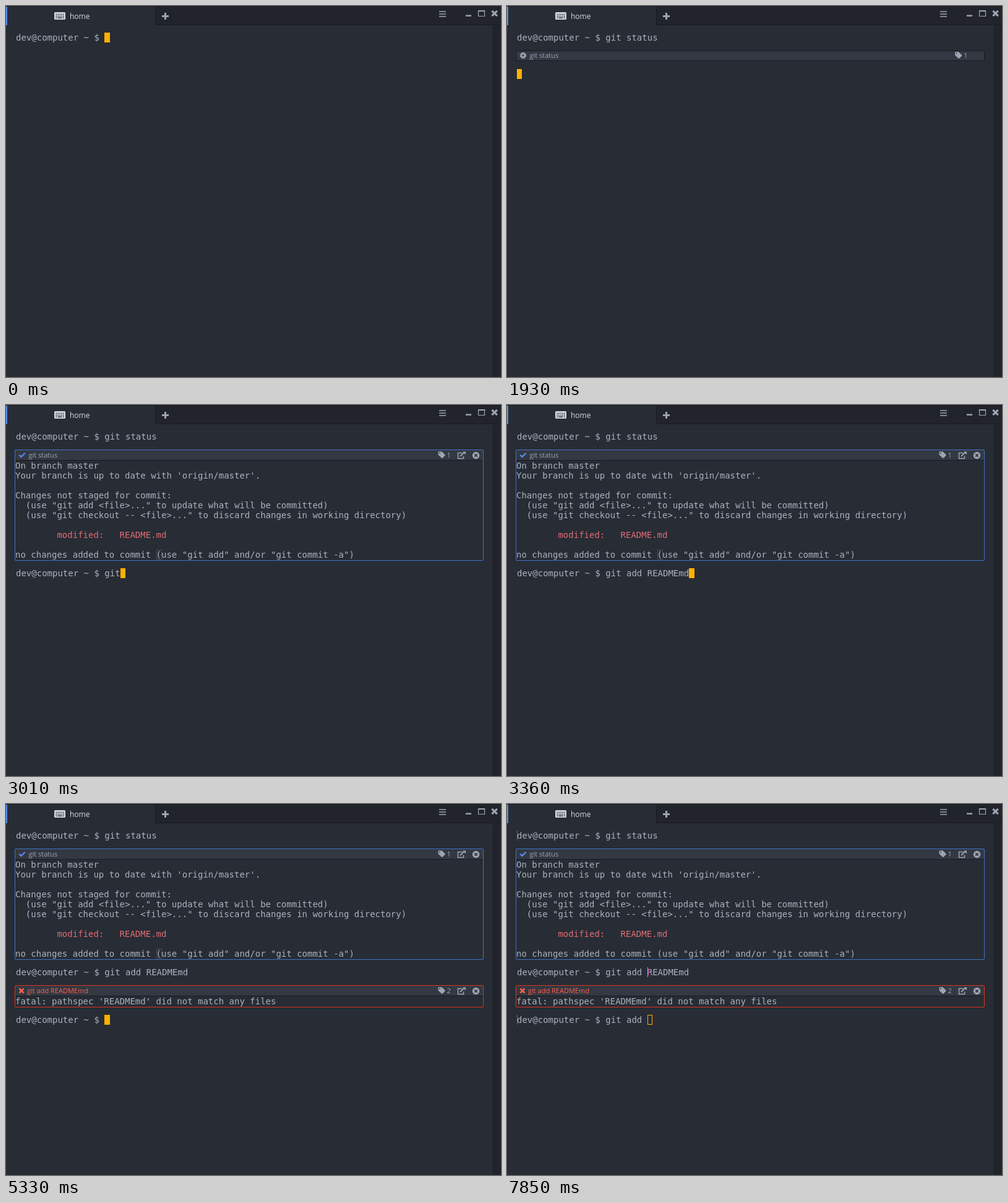
Write an HTML page that moves like this. It is 800 px wide and 600 px high and loops after 8000 ms.

```html
<!DOCTYPE html>
<html lang="en">
<head>
<meta charset="utf-8">
<title>Terminal</title>
<style>
html, body { margin: 0; width: 100%; height: 100%; overflow: hidden; background: #282c34; }
svg { display: block; width: 100vw; height: 100vh; }
text { white-space: pre; }
.mono { font: 14px "DejaVu Sans Mono", monospace; fill: #abb2bf; }
.ui { font: 11px "Open Sans", "Noto Sans", sans-serif; fill: #9da5b4; }
.tab { font-size: 12px; fill: #d7dae0; }
</style>
</head>
<body>
<svg viewBox="0 0 800 600">
  <rect width="800" height="600" fill="#282c34"/>
  <rect width="800" height="31" fill="#21252b"/>
  <rect x="786" y="31" width="14" height="569" fill="#21252b"/>
  <rect width="800" height="1" fill="#181a1f"/>
  <rect x="241" y="30" width="559" height="1" fill="#181a1f"/>
  <rect y="1" width="241" height="30" fill="#282c34"/>
  <rect x="241" width="1" height="31" fill="#181a1f"/>
  <rect y="1" width="2" height="30" fill="#568af2"/>
  <g id="keyboard">
    <rect x="78" y="10" width="18" height="12" rx="1.5" fill="#d7dae0"/>
    <path d="M80.5 13.5H94M80.5 16.5H94" stroke="#282c34" stroke-width="1.6" stroke-dasharray="1.7 1.2"/>
    <path d="M80.5 19.3h1.7M83.5 19.3h7M92 19.3h1.7" stroke="#282c34" stroke-width="1.5"/>
  </g>
  <text class="ui tab" x="103" y="21">home</text>
  <g stroke="#9da5b4" fill="none">
    <path d="M252 16.5h11M257.5 11v11" stroke-width="3"/>
    <path d="M700 9h11M700 13h11M700 17h11" stroke-width="1.6"/>
    <path d="M743 15.7h9" stroke-width="2.4"/>
    <path d="M763.5 7.5h10v9h-10zM763 8.3h11" stroke-width="1.2"/>
    <path d="M785.3 7.8l8.4 8.4m0-8.4l-8.4 8.4" stroke-width="3.2"/>
  </g>
  <g id="screen"></g>
</svg>
<script>
const LOOP = 8000, CELL = 8.428, LEFT = 16;
const GREY = '#9da5b4', AMBER = '#ffb000';
const PROMPT = 'dev@computer ~ $ ';
const screen = document.getElementById('screen');

const STATUS = [
  'On branch master',
  "Your branch is up to date with 'origin/master'.",
  '',
  'Changes not staged for commit:',
  '  (use "git add <file>..." to update what will be committed)',
  '  (use "git checkout -- <file>..." to discard changes in working directory)',
  '',
  '        modified:   README.md',
  '',
  'no changes added to commit (use "git add" and/or "git commit -a")'
];
const FATAL = ["fatal: pathspec 'READMEmd' did not match any files"];

const esc = s => s.replace(/&/g, '&amp;').replace(/</g, '&lt;');
const rect = (x, y, w, h, fill, extra = '') =>
  `<rect x="${x}" y="${y}" width="${w}" height="${h}" fill="${fill}" ${extra}/>`;
const label = (x, y, s, cls, fill) =>
  `<text class="${cls}" x="${x}" y="${y}"${fill ? ` style="fill:${fill}"` : ''}>${esc(s)}</text>`;
const line = (d, stroke, width) =>
  `<path d="${d}" fill="none" stroke="${stroke}" stroke-width="${width}"/>`;

// Part of a command typed in equal steps between two times
function typed(cmd, t, start, end, steps) {
  const done = Math.floor((t - start) / (end - start) * (steps - 1) + 1.02);
  const n = Math.max(0, Math.min(steps, done));
  return cmd.slice(0, Math.round(cmd.length * n / steps));
}

function cursor(col, y, hollow) {
  const x = Math.round(LEFT + col * CELL);
  const w = Math.round(LEFT + (col + 1) * CELL) - x;
  return hollow
    ? rect(x + .5, y + .5, w - 1, 15, 'none', `stroke="${AMBER}"`)
    : rect(x, y, w, 16, AMBER);
}

function prompt(y, cmd, active, hollow) {
  return label(LEFT, y + 13, PROMPT + cmd, 'mono') +
    (active ? cursor(PROMPT.length + cmd.length, y, hollow) : '');
}

const tag = (x, y) =>
  `<path d="M${x} ${y - 4}v4.5l5.5 5.3q.8.5 1.5 0l4-4q.5-.8 0-1.5l-5.2-5h-5q-.8 0-.8.7z" fill="${GREY}"/>` +
  `<circle cx="${x + 2.3}" cy="${y - 2.3}" r="1" fill="#333842"/>`;

const gear = (x, y) =>
  `<circle cx="${x}" cy="${y}" r="3" fill="none" stroke="${GREY}" stroke-width="2.6"/>` +
  `<circle cx="${x}" cy="${y}" r="4.5" fill="none" stroke="${GREY}" stroke-width="1.8" stroke-dasharray="2 1.534"/>`;

function running(y, cmd, id) {
  return rect(14.5, y + .5, 757, 16, '#333842', 'rx="1.5" stroke="#181a1f"') +
    gear(26, y + 8) + label(36.5, y + 12, cmd, 'ui') +
    tag(724, y + 7) + label(738, y + 12, id, 'ui') +
    cursor(0, y + 30);
}

function finished(y, cmd, id, rows, failed) {
  const h = 19 + rows.length * 16 + (failed ? 1 : 0);
  const edge = failed ? '#dd3322' : '#3f73c4';
  const mid = y + 9;
  const status = failed
    ? line(`M21.5 ${mid - 3.5}l7 7m0-7l-7 7`, '#ff5f4a', 2.6) + label(34, y + 13, cmd, 'ui', '#ff5f4a')
    : line(`M21.3 ${mid - .3}l3.2 3.2 6.2-6.2`, '#568af2', 2.3) + label(36.5, y + 13, cmd, 'ui');
  const link = line(`M737 ${mid - 3.5}h-6.5v9h9v-4`, GREY, 1.5) +
    line(`M734 ${mid + 2}l6.5-6.5`, GREY, 1.8) +
    `<path d="M738 ${mid - 5.5}h5v5z" fill="${GREY}"/>`;
  const close = `<circle cx="759.5" cy="${mid + .5}" r="5.7" fill="${GREY}"/>` +
    line(`M757.3 ${mid - 1.7}l4.4 4.4m0-4.4l-4.4 4.4`, '#333842', 1.8);
  const body = rows.map((s, i) =>
    label(15, y + 31 + i * 16, s, 'mono', s.includes('modified') && '#e06c75')).join('');
  return rect(15, y + 1, 756, 16, '#333842') + rect(15, y + 17, 756, 1, '#181a1f') +
    status + tag(698.5, mid - 1) + label(712.5, y + 13, id, 'ui') + link + close + body +
    rect(14.5, y + .5, 757, (failed ? 35 : h), 'none', `rx="1.5" stroke="${edge}"`);
}

// Caret that walks through the scrollback, and the faint resting marks
const caret = y => rect(227, y, 1, 16, AMBER) + rect(228, y + 3, 1, 10, '#a43bea');
const mark = y => rect(16, y, 1, 16, '#6f665d');

function draw(t) {
  const first = typed('git status', t, 500, 670, 3);
  let out = prompt(43, first, t < 1930);
  if (t < 1930) return out;
  if (t < 2020) return out + running(72, first, '1');

  const second = typed('git add READMEmd', t, 3010, 3360, 5);
  out += finished(72, first, '1', STATUS, false);
  if (t < 7040) out += rect(243.5, 234.5, 8, 15, 'none', 'stroke="#4a4e57"');
  out += prompt(264, second, t < 4530);
  if (t < 4530) return out;
  if (t < 4610) return out + running(293, second, '2');

  const third = typed('git add ', t, 5690, 5870, 3);
  out += finished(293, second, '2', FATAL, true) + prompt(341, third, true, t >= 7400);
  if (t < 7040) return out;
  out += mark(43);
  if (t < 7400) return out + mark(264) + caret(341);
  out += mark(341);
  if (t < 7490) return out + mark(264);
  return out + (t < 7850 ? mark(264) + rect(227, 311, 1, 16, AMBER) : caret(264));
}

let shown = '';
const began = performance.now();
function tick() {
  const next = draw((performance.now() - began) % LOOP);
  if (next !== shown) screen.innerHTML = shown = next;
  requestAnimationFrame(tick);
}
tick();
</script>
</body>
</html>
```
